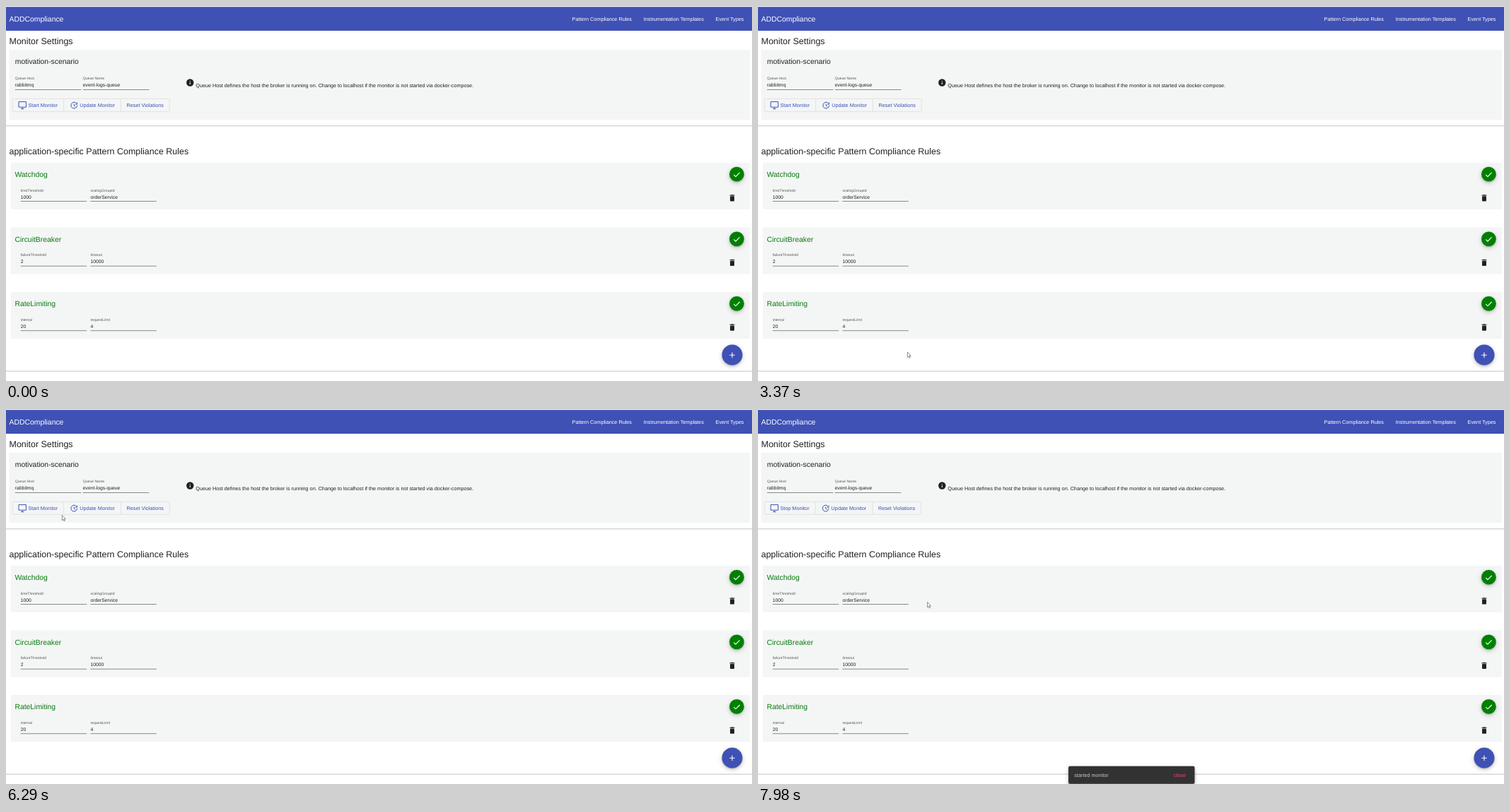
An HTML page for the animation above (8000 ms loop, 1055 px wide and 531 px high).

```html
<!DOCTYPE html>
<html lang="en">
<head>
<meta charset="utf-8">
<title>Compliance monitor</title>
<style>
  html, body { margin: 0; width: 100%; height: 100%; overflow: hidden; background: #fff; }
  svg { display: block; width: 100%; height: 100%; }
  text { font-family: "Liberation Sans", Arial, sans-serif; text-rendering: geometricPrecision; }
  .shadow { filter: drop-shadow(0 1.5px 1.2px #0003) drop-shadow(0 2px 3px #0003); }
</style>
</head>
<body>
<svg id="stage" viewBox="0 0 1055 531"></svg>
<script>
const INK = '#212121', BLUE = '#3f51b5', GREEN = '#0b7a0f', PANEL = '#f4f6f6', RULE = '#c2c2c2';
const TITLE = 12.48, SUBTITLE = 10.4, BODY = 7.28, VALUE = 6.8, LABEL = 5.08;

// Text is placed by its left edge and baseline.
const text = (x, y, size, str, fill = INK, extra = '') =>
  `<text x="${x}" y="${y}" font-size="${size}" fill="${fill}" ${extra}>${str}</text>`;
const rect = (x, y, w, h, fill, extra = '') =>
  `<rect x="${x}" y="${y}" width="${w}" height="${h}" fill="${fill}" ${extra}/>`;
const disc = (x, y, r, fill, extra = '') => `<circle cx="${x}" cy="${y}" r="${r}" fill="${fill}" ${extra}/>`;
const line = (x, y, d, color, width = 1) =>
  `<path transform="translate(${x} ${y})" d="${d}" fill="none" stroke="${color}" stroke-width="${width}"/>`;
const group = (id, body) => `<g id="${id}">${body}</g>`;

const field = (x, y, label, value) =>
  text(x, y, LABEL, label, '#555') + text(x, y + 10.1, VALUE, value) +
  rect(x, y + 13.7, 93.5, .75, '#666');

const bin = (x, y) =>
  rect(x - 3, y - 2.6, 6, 7.3, INK, 'rx="1"') + rect(x - 3.6, y - 4.2, 7.2, 1, INK) +
  rect(x - 1.5, y - 4.7, 3, 1, INK);

const card = (i, name, ...fields) => `<g transform="translate(0 ${i * 91.6})">` +
  rect(7, 221.7, 1045, 66.3, PANEL) + text(12.4, 242, SUBTITLE, name, GREEN) +
  fields.map(([label, value], k) => field(20.7 + k * 98.7, 262.5, label, value)).join('') +
  disc(1033.4, 238.2, 10.4, '#008000', 'class="shadow"') +
  line(1033.4, 239, 'M-4.1 0L-1.5 2.6 4.3-3.2', '#fff', 1.1) + bin(1027, 271.8) + '</g>';

const screen = line(23.2, 139.6, 'M-5.2-4H5.2V3.6H-5.2zM0 4V6M-2.2 6H2.2', BLUE);
const clock = line(96.3, 140.7, 'M3.2-3.1A4.4 4.4 0 1 0 4.4.1M0-2.2V.4L2 1.6M4.3-4V-1.5H1.8', BLUE);
const info = disc(260.3, 108.5, 5.2, INK) + line(260.3, 108.5, 'M0-2.6V-1.6M0-.5V2.6', '#fff');

document.getElementById('stage').innerHTML =
  rect(0, 1.2, 1055, 33.8, BLUE) +
  text(4.6, 22, SUBTITLE, 'ADDCompliance', '#fff') +
  text(800.6, 20.8, BODY, 'Pattern Compliance Rules', '#fff') +
  text(901.7, 20.8, BODY, 'Instrumentation Templates', '#fff') +
  text(1003.6, 20.8, BODY, 'Event Types', '#fff') +

  text(4.5, 54.3, TITLE, 'Monitor Settings') +
  rect(4.5, 61.8, 1047.5, 99.2, PANEL) +
  text(12.8, 82, SUBTITLE, 'motivation-scenario') +
  field(12.8, 104.3, 'Queue Host', 'rabbitmq') +
  field(108.8, 104.3, 'Queue Name', 'event-logs-queue') +
  info + text(268.3, 114.6, 7.22, 'Queue Host defines the host the broker is running on. ' +
    'Change to localhost if the monitor is not started via docker-compose.') +
  rect(9, 131.3, 222.3, 18, 'none', 'id="frame" rx="2" stroke="#dcdede" stroke-width=".8"') +
  rect(9, 131.3, 72.6, 18, BLUE, 'id="press" rx="2"') +
  screen + text(31.4, 143.1, BODY, '', BLUE, 'id="toggle"') +
  group('rest',
    rect(81.3, 131.3, .8, 18, '#dcdede') + rect(162.2, 131.3, .8, 18, '#dcdede') + clock +
    text(104.2, 143.1, BODY, 'Update Monitor', BLUE) +
    text(170.5, 143.1, BODY, 'Reset Violations', BLUE)) +
  rect(0, 169.3, 1055, 1, RULE) +

  text(4.5, 210.2, TITLE, 'application-specific Pattern Compliance Rules') +
  card(0, 'Watchdog', ['timeThreshold', '1000'], ['scalingGroupId', 'orderService']) +
  card(1, 'CircuitBreaker', ['failureThreshold', '2'], ['timeout', '10000']) +
  card(2, 'RateLimiting', ['interval', '20'], ['requestLimit', '4']) +
  rect(0, 516.6, 1055, 1, RULE) +
  disc(1027, 494, 14.5, BLUE, 'class="shadow"') + line(1027, 494.3, 'M-3.7 0H3.7M0-3.7V3.7', '#fff', 1.1) +

  group('snack',
    rect(439, 505.7, 178.5, 25, '#323232', 'rx="2" class="shadow"') +
    text(447.3, 520.6, BODY, 'started monitor', '#c8c8c8') +
    text(588, 520.6, BODY, 'close', '#ff4081')) +
  `<g id="pointer" stroke-width=".6" stroke="#444" fill="#fff">
    <path id="arrow" d="M.3.3V7.6L2 6.1 3.1 8.6 4.2 8.1 3.1 5.7H5.2z"/>
    <path id="beam" fill="none" d="M-1.5-.5H1.5M0-.5V7.5M-1.5 7.5H1.5"/>
    <path id="hand" d="M-1 1Q0-.3 1 1V4L4 4.7Q5 5 4.8 6.5L4 9.3H0L-2.6 5.8Q-2.4 4.7-1 5.8z"/>
  </g>`;

// Pointer strokes: times, end point and, for curved ones, what they bend towards.
const strokes = [
  { from: 590, to: 810, end: [484, 319] },
  { from: 1120, to: 1900, end: [123, 419] },
  { from: 1960, to: 2740, end: [14, 449], bend: [-14, 380] },
  { from: 2820, to: 3610, end: [229, 469], bend: [224, 525] },
  { from: 3680, to: 4000, end: [201, 431] },
  { from: 4230, to: 4535, end: [151, 417], bend: [156, 419] },
  { from: 4780, to: 5580, end: [60, 153], bend: [200, 300] },
  { from: 5660, to: 6430, end: [96, 158], bend: [43, 132] },
  { from: 6520, to: 6600, end: [57, 142.3] },
  { from: 7750, to: 7980, end: [239.3, 273.2] }
];
const STEP = 78;

function pointerAt(t) {
  let at = [1100, 590];
  for (const { from, to, end, bend } of strokes) {
    if (t < from) break;
    const last = Math.round((to - from) / STEP);
    const step = Math.min(last, Math.floor((t - from) / (to - from) * last + .05));
    const u = (step + 1) / (last + 1), v = 1 - u;
    at = at.map((a, axis) => {
      const mid = bend ? bend[axis] : (a + end[axis]) / 2;
      return v * v * a + 2 * u * v * mid + u * u * end[axis];
    });
  }
  return at;
}

const inside = (x, y, l, t, r, b) => x >= l && x <= r && y >= t && y <= b;
function shapeAt(x, y) {
  if (inside(x, y, 9, 131, 231, 150)) return 'hand';
  if (inside(x, y, 10, 409, 71, 428) || inside(x, y, 20, 441, 114, 460)) return 'beam';
  return 'arrow';
}

const $ = id => document.getElementById(id);
function draw(t) {
  const [x, y] = pointerAt(t), shape = shapeAt(x, y), started = t >= 6760;
  $('pointer').setAttribute('transform', `translate(${x} ${y})`);
  for (const id of ['arrow', 'beam', 'hand']) $(id).style.display = id === shape ? '' : 'none';

  // The shorter label pulls the other buttons to the left.
  const shift = started ? .6 : 0;
  $('toggle').textContent = started ? 'Stop Monitor' : 'Start Monitor';
  $('rest').setAttribute('transform', `translate(${-shift} 0)`);
  $('frame').setAttribute('width', 222.3 - shift);
  $('press').setAttribute('opacity', started || t < 6520 ? 0 : t < 6600 ? .07 : .14);

  const shown = started ? Math.min(1, (1 + Math.floor((t - 6760) / 85)) / 3) : 0;
  $('snack').setAttribute('opacity', shown);
  $('snack').setAttribute('transform', `translate(528 518) scale(${.8 + .2 * shown}) translate(-528 -518)`);
}

const origin = performance.now();
function tick() {
  draw((performance.now() - origin) % 8000);
  requestAnimationFrame(tick);
}
tick();
</script>
</body>
</html>
```
